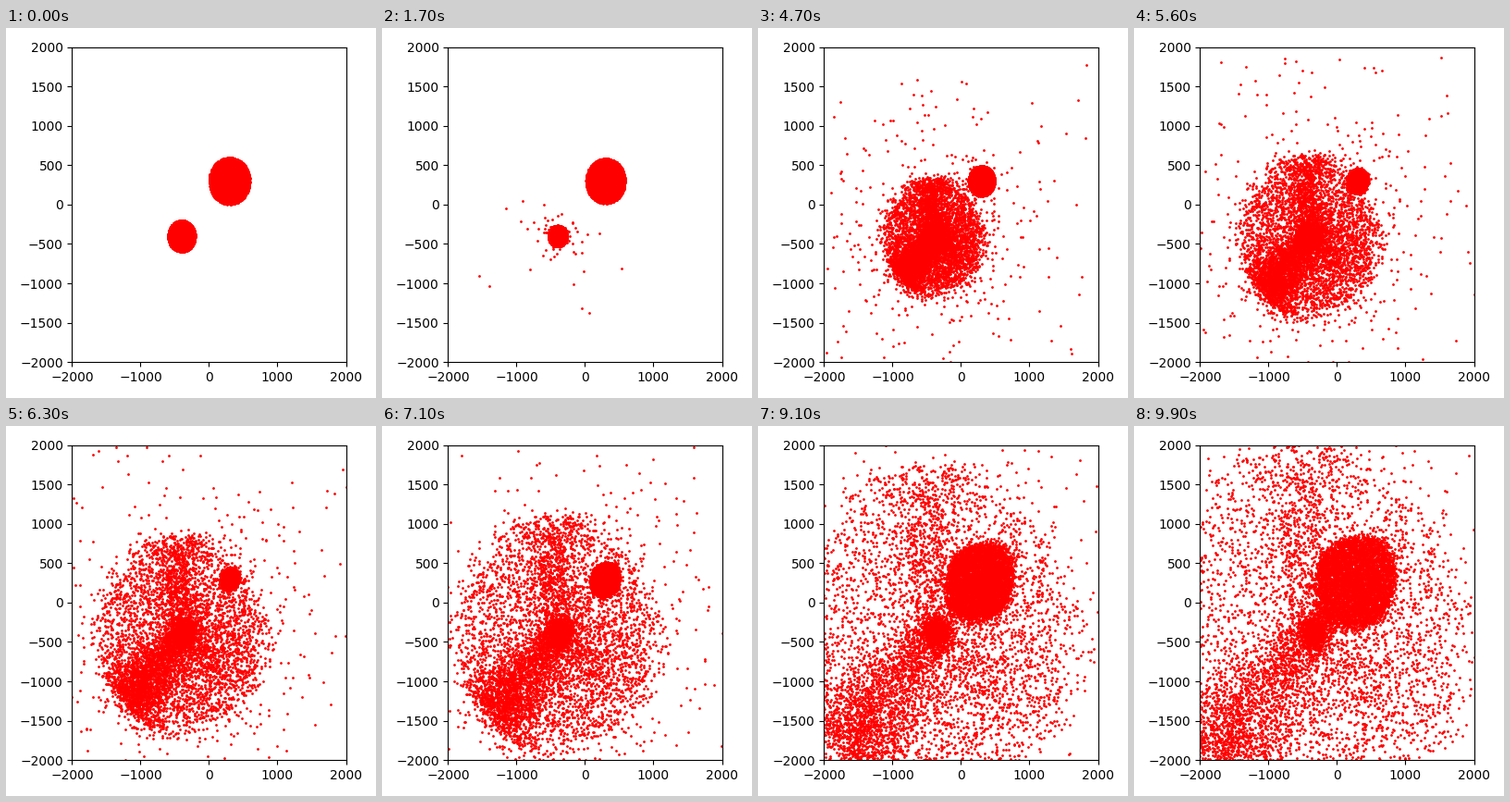
A matplotlib script for the animation above (10 s loop, 400x400 px).

```python
import numpy as np
import matplotlib.pyplot as plt
from matplotlib.animation import FuncAnimation

FRAMES, STEP_MS = 100, 100
rng = np.random.default_rng(7)


def polar(r, a):
    return np.column_stack([r * np.cos(a), r * np.sin(a)])


def angles(n):
    return rng.uniform(0, 2 * np.pi, n)


def disc(n, power=0.5):
    """Unit disc; powers above 0.5 crowd the centre."""
    return polar(rng.random(n) ** power, angles(n))


def blob(n, x, y, sigma):
    return rng.normal((x, y), sigma, (n, 2))


def ray(n, heading, length, base, spread):
    """Stream of velocities along a heading, widening outwards."""
    s = rng.random(n)
    along = np.array([np.cos(heading), np.sin(heading)])
    across = np.array([-along[1], along[0]])
    side = rng.normal(0, 1, n) * (base + spread * s)
    return np.outer(s * length, along) + np.outer(side, across)


# Free fall from rest: radius ratio as a function of t / t_collapse
RATIO = np.linspace(1, 0, 400)
FALL = (np.arccos(np.sqrt(RATIO)) + np.sqrt(RATIO * (1 - RATIO))) * 2 / np.pi


def infall(t, collapse):
    return np.interp(t / collapse, FALL, RATIO)


def ramp(t, start, length):
    s = np.clip((t - start) / length, 0, 1)
    return s * s * (3 - 2 * s)


class Ejecta:
    """Particles thrown out of a cluster, each at its own moment."""

    def __init__(self, n, start, span, speed, sigma):
        self.when = start + span * rng.random(n) ** 0.4
        fast = speed * np.exp(np.abs(rng.normal(0, sigma, n)))
        self.vel = polar(fast, angles(n))

    def offset(self, t):
        return self.vel * np.maximum(t - self.when, 0)[:, None]


# Small cluster: collapses early, leaves a bound core and a wide shell
B_POS, B_RADIUS, B_FALL, B_BOUNCE = np.array([-400, -400]), 200, 2.5, 2.38
B_COUNT, B_CORE, B_OUT = 7600, 950, 400
b_start = disc(B_COUNT) * B_RADIUS
b_core = rng.normal(0, 95, (B_CORE, 2))
b_out = Ejecta(B_OUT, 0.3, 2.7, 300, 0.75)
b_parts = [
    ray(1450, np.radians(228), 310, 22, 48),
    blob(500, -158, -185, 52),
    ray(600, np.radians(93), 320, 25, 35),
    blob(500, 95, -75, 80),
]
rest = B_COUNT - B_CORE - B_OUT - sum(map(len, b_parts))
b_parts.append(disc(rest, 0.57) * 310 * rng.normal(1, 0.08, (rest, 1)))
b_vel = np.vstack(b_parts)


def small_cluster(t):
    pos = B_POS + b_start * infall(t, B_FALL)
    pos[:B_CORE] += b_core * ramp(t, 2.0, 1.0)
    pos[:B_CORE] += np.array([8, 3]) * max(t - 3, 0)
    pos[B_CORE:B_CORE + B_OUT] += b_out.offset(t)
    pos[B_CORE + B_OUT:] += b_vel * max(t - B_BOUNCE, 0)
    return pos


# Large cluster: shrinks slowly, then rebounds stretched along the diagonal
A_POS, A_RADIUS, A_FALL, A_BOUNCE = np.array([300, 300]), 300, 6.6, 6.2
A_COUNT, A_OUT = 5200, 200
a_start = disc(A_COUNT) * A_RADIUS
a_shape = disc(A_COUNT, 0.54)
theta = np.arctan2(a_shape[:, 1], a_shape[:, 0])
a_shape *= (0.97 + 0.03 * (1 - np.cos(4 * theta))
            + 0.07 * np.sin(2 * theta))[:, None]
a_shape *= rng.normal(0.96, 0.06, (A_COUNT, 1))
a_out = Ejecta(A_OUT, 5.8, 2.0, 130, 0.6)


def large_cluster(t):
    rebound = 235 * max(t - A_BOUNCE, 0) ** 0.74
    size = np.hypot(90 * ramp(t, 5.0, 1.3) * (1 - ramp(t, 6.5, 1)), rebound)
    pos = A_POS - 12 * max(t - 6.5, 0) + a_start * infall(t, A_FALL)
    pos += a_shape * size
    pos[:A_OUT] += a_out.offset(t)
    return pos


fig, ax = plt.subplots(figsize=(4, 4), dpi=100)
ax.set_xlim(-2000, 2000)
ax.set_ylim(-2000, 2000)
ax.set_xticks(range(-2000, 2001, 1000))
ax.set_yticks(range(-2000, 2001, 500))
dots, = ax.plot([], [], "ro", markersize=1)
fig.tight_layout()


def update(i):
    t = i * STEP_MS / 1000
    pos = np.vstack([large_cluster(t), small_cluster(t)])
    dots.set_data(pos[:, 0], pos[:, 1])
    return dots,


anim = FuncAnimation(fig, update, frames=FRAMES, interval=STEP_MS,
                     repeat=True, repeat_delay=0)
plt.show()
```
